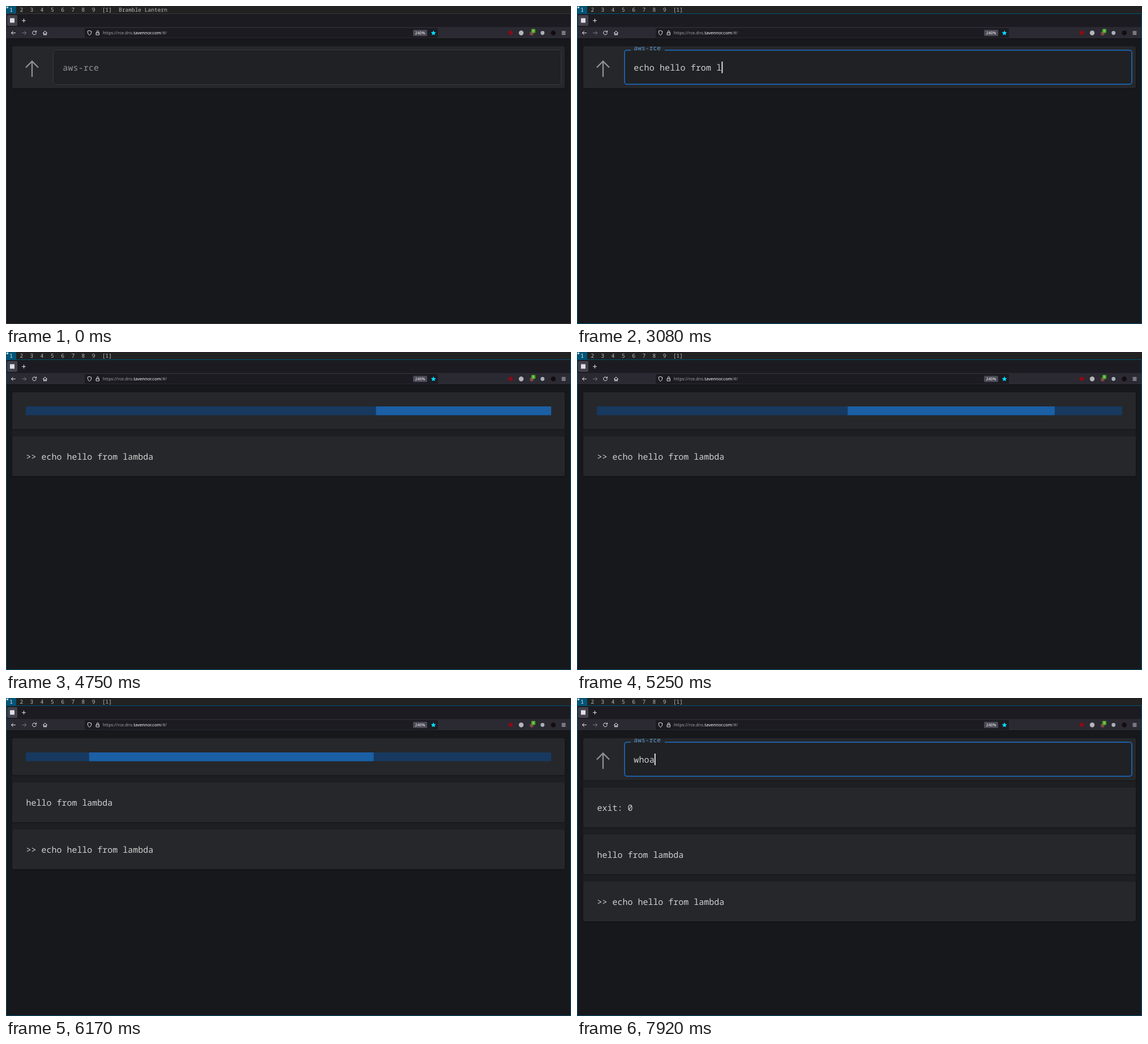
An HTML page that plays this animation: 998 px wide and 561 px high, repeating every 8000 ms.

```html
<!DOCTYPE html>
<html lang="en">
<head>
<meta charset="utf-8">
<title>Remote shell</title>
<style>
html, body { margin: 0; width: 100%; height: 100%; overflow: hidden; background: #17181b; }
svg { display: block; width: 100%; height: 100%; }
text { white-space: pre; text-rendering: geometricPrecision; }
.mono { font: 14.97px "Noto Sans Mono", monospace; fill: #d0d0d0; }
.input { letter-spacing: .14px; }
.wm { font: 9.55px "Noto Sans Mono", monospace; fill: #bbb; }
.ui { font: 7.6px "Noto Sans", sans-serif; fill: #a3a2aa; }
.bright { fill: #fbfbfe; }
.line { fill: none; stroke: #e6e6ec; stroke-width: 1; stroke-linecap: round; stroke-linejoin: round; }
.card { fill: #26272a; filter: drop-shadow(0 1px 1px rgba(0, 0, 0, .3)); }
</style>
</head>
<body>
<svg viewBox="0 0 998 561">
  <rect width="998" height="561" fill="#17181b"/>

  <!-- window manager bar -->
  <rect width="998" height="13" fill="#222"/>
  <rect width="18" height="13" fill="#057"/>
  <rect id="marker" x="1.5" y="1.5" width="2" height="2" stroke="#eee" stroke-width="1"/>
  <g id="workspaces"></g>
  <text class="wm" x="169.8" y="10.3">[1]</text>
  <text class="wm" id="title" x="199" y="10.3">Bramble Lantern</text>

  <!-- browser chrome -->
  <rect y="14" width="998" height="23" fill="#1c1b22"/>
  <rect x="2" y="16" width="18" height="19" rx="2" fill="#42414d"/>
  <rect x="7" y="21.5" width="8" height="8" rx=".5" fill="#dedee4"/>
  <path class="line" d="M28.5 25.7h6M31.5 22.7v6"/>
  <rect y="37" width="998" height="20" fill="#2b2a33"/>
  <rect y="57" width="998" height="1" fill="#101014"/>
  <path class="line" d="M16.5 47.5h-7m3-3-3 3 3 3"/>
  <path class="line" d="M28.5 47.5h7m-3-3 3 3-3 3" opacity=".4"/>
  <path class="line" d="M53 45.6a3.4 3.4 0 1 0 .4 2.6M53.6 43.8v2.3h-2.3"/>
  <path class="line" d="M65.5 47.5 69 44.2l3.5 3.3M66.5 47v4h1.8v-2.4h1.4V51h1.8v-4"/>
  <rect x="139" y="39" width="624" height="17" rx="2" fill="#1c1b22"/>
  <path class="line" d="M147.5 43.5l3.3 1.2c0 3.5-1 5.5-3.3 6.8-2.3-1.3-3.3-3.3-3.3-6.8z"/>
  <path class="line" d="M159.5 47.2h5v3.8h-5zM160.4 47v-1.6a1.6 1.6 0 0 1 3.2 0V47"/>
  <text class="ui" x="171" y="50.3">https://rce.dns.<tspan class="bright">tavennor.com</tspan>/#/</text>
  <rect x="719" y="42" width="25" height="11" rx="1.5" fill="#4a4954"/>
  <text class="ui bright" x="731.5" y="50.2" text-anchor="middle" style="font-size:7px">240%</text>
  <path fill="#00ddff" d="M755 43l1.3 3 3.2.3-2.4 2.1.7 3.2-2.8-1.7-2.8 1.7.7-3.2-2.4-2.1 3.2-.3z"/>
  <circle cx="891.5" cy="47.3" r="3.8" fill="#8b0a12"/>
  <circle cx="910" cy="47.5" r="4.2" fill="#b4b4ba"/>
  <circle cx="928.5" cy="48.5" r="3.4" fill="#7c4747"/>
  <rect x="928" y="40.5" width="7" height="7" rx="1" fill="#4cae22"/>
  <text class="ui bright" x="931.5" y="46.2" text-anchor="middle" style="font-size:6px">1</text>
  <circle cx="947.7" cy="47.5" r="3.4" fill="#a9b0b8"/>
  <circle cx="966.7" cy="47.5" r="4.3" fill="#150c0e"/>
  <path class="line" d="M982 45h6M982 47.5h6M982 50h6"/>

  <!-- page -->
  <rect id="paper" x="11" y="71" width="976" fill="#1e1f22" rx="3"/>
  <rect class="card" id="head" x="11" y="71" width="976" rx="3"/>
  <g id="prompt">
    <path d="M46 125V97.5M35 108.5l11-11 11 11" fill="none" stroke="#919192" stroke-width="2.3"/>
    <rect x="83" y="77" width="898" height="62" rx="4" fill="#202124"/>
    <rect id="frame" rx="4" fill="none"/>
    <rect id="notch" y="76" height="3" fill="#26272a"/>
    <text class="mono input" id="label">aws-rce</text>
    <text class="mono input" id="typed" x="100.3" y="113.7"></text>
    <rect id="caret" y="98" width="2" height="20.5" fill="#dcdcdc"/>
  </g>
  <g id="progress">
    <rect x="35" y="96" width="928" height="15.5" fill="#17395f"/>
    <rect id="bar1" y="96" height="15.5" fill="#1b5fa5"/>
    <rect id="bar2" y="96" height="15.5" fill="#1b5fa5"/>
  </g>
  <g id="rows"></g>
  <rect id="border" x=".5" y="13.5" width="997" height="547" fill="none"/>
</svg>
<script>
const LOOP = 8000, TICK = 1000 / 12;
const FOCUS = 815, BUSY = 44, OUTPUT = 69, DONE = 80, REFOCUS = 6650;
const CHAR = 9.122;
// Ticks at which each character is typed.
const FIRST = {
  text: "echo hello from lambda",
  keys: [18, 19, 19, 21, 21, 24, 25, 26, 28, 30, 31, 32, 34, 35, 36, 37, 37, 38, 39, 40, 43, 43]
};
const SECOND = { text: "whoa", keys: [89, 90, 91, 95] };

const $ = id => document.getElementById(id);
const set = (id, attrs) => Object.entries(attrs).forEach(([k, v]) => $(id).setAttribute(k, v));
const show = (id, on) => set(id, { visibility: on ? "visible" : "hidden" });
const clamp = v => Math.min(1, Math.max(0, v));
const mix = (a, b, p) => a + (b - a) * p;

function bezier(x1, y1, x2, y2) {
  const at = (a, b, s) => 3 * (1 - s) ** 2 * s * a + 3 * (1 - s) * s * s * b + s ** 3;
  return x => {
    let lo = 0, hi = 1;
    for (let i = 0; i < 24; i++) {
      const mid = (lo + hi) / 2;
      if (at(x1, x2, mid) < x) lo = mid; else hi = mid;
    }
    return at(y1, y2, (lo + hi) / 2);
  };
}
const easeOut = bezier(0, 0, .2, 1);
const longEase = bezier(.65, .815, .735, .395);
const shortEase = bezier(.165, .84, .44, 1);

$("workspaces").innerHTML = [1, 2, 3, 4, 5, 6, 7, 8, 9].map(n =>
  `<text class="wm" x="${6.2 + (n - 1) * 18.2}" y="10.3"${n === 1 ? ' style="fill:#eee"' : ""}>${n}</text>`).join("");

const rowTexts = ["exit: 0", "hello from lambda", "&gt;&gt; " + FIRST.text];
$("rows").innerHTML = rowTexts.map((text, i) =>
  `<g id="row${i}"><rect class="card" x="11" width="976" height="70" rx="3"/>
   <text class="mono" x="35.6" y="41">${text}</text></g>`).join("");

// left and right are percentage insets; elapsed is negative before the bar starts.
function drawBar(id, elapsed, ease, left, right) {
  const p = ease(clamp((elapsed % 2100) / 1260));
  const from = clamp(mix(...left, p) / 100);
  const to = clamp(1 - mix(...right, p) / 100);
  set(id, { x: 35 + 928 * from, width: elapsed < 0 ? 0 : 928 * Math.max(0, to - from) });
}

function drawPrompt(t, tick) {
  const focusAt = tick < BUSY ? FOCUS : REFOCUS;
  const focused = t >= focusAt;
  const p = easeOut(clamp((t - focusAt) / 200));
  const entry = tick < BUSY ? FIRST : SECOND;
  const count = entry.keys.filter(k => k <= tick).length;
  const inset = focused ? 1 : .5;
  set("frame", {
    x: 83 + inset, y: 77 + inset, width: 898 - 2 * inset, height: 62 - 2 * inset,
    stroke: focused ? "#1b5fa5" : "#393a3d", "stroke-width": 2 * inset
  });
  set("notch", { x: 95, width: 60 * p });
  const color = [[148, 90], [148, 155], [149, 212]].map(([a, b]) => Math.round(mix(a, b, p)));
  set("label", {
    transform: `translate(100.3 ${mix(113.7, 78.3, p)}) scale(${mix(1, .75, p)})`,
    style: `fill:rgb(${color})`
  });
  $("typed").textContent = entry.text.slice(0, count);
  set("caret", { x: 100.3 + count * CHAR, width: focused ? 2 : 0 });
}

function draw(now) {
  const tick = Math.floor((now % LOOP + 5) / TICK);
  const t = tick * TICK;
  const active = tick >= 8;
  const busy = tick >= BUSY && tick < DONE;

  set("marker", { fill: active ? "#eee" : "none" });
  set("border", { stroke: active ? "#057" : "#38383a" });
  show("title", !active);
  show("prompt", !busy);
  show("progress", busy);

  if (busy) {
    const elapsed = t - 3650 - 17.5 * clamp((t - 4083) / 1167);
    drawBar("bar1", elapsed, longEase, [-35, 100], [100, -90]);
    drawBar("bar2", elapsed - 1150, shortEase, [-200, 107], [100, -8]);
  } else {
    drawPrompt(t, tick);
  }

  const headHeight = busy ? 65 : 74;
  let bottom = 71 + headHeight;
  set("head", { height: headHeight });
  [DONE, OUTPUT, BUSY].forEach((start, i) => {
    const visible = tick >= start;
    show("row" + i, visible);
    if (!visible) return;
    set("row" + i, { transform: `translate(0 ${bottom + 13})` });
    bottom += 83;
  });
  set("paper", { height: bottom - 71 });
}

const origin = performance.now();
function loop() {
  draw(performance.now() - origin);
  requestAnimationFrame(loop);
}
loop();
</script>
</body>
</html>
```
